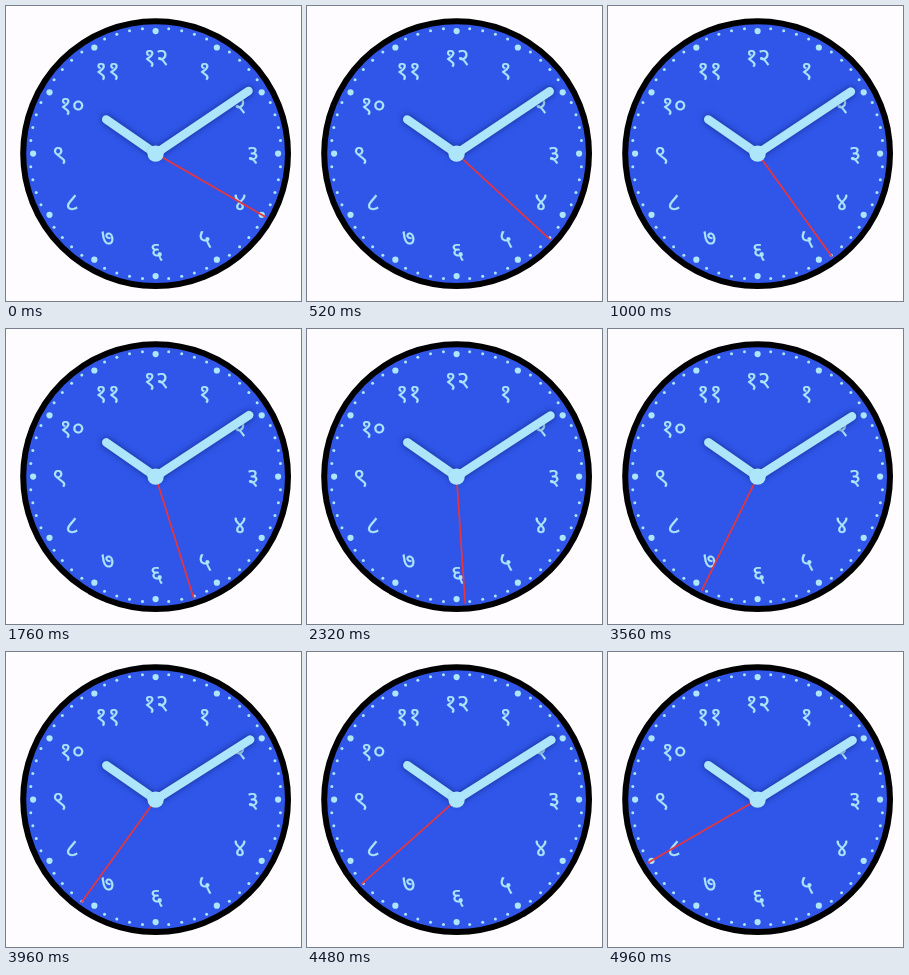
Write an HTML page that moves like this. It is 295 px wide and 295 px high and loops after 5000 ms.

```html
<!DOCTYPE html>
<html lang="hi">
<head>
<meta charset="utf-8">
<title>Clock</title>
<style>
  html, body { margin: 0; width: 100%; height: 100%; overflow: hidden; background: #fefcff; }
  svg { display: block; width: 100vw; height: 100vh; }
  text {
    font: 24.5px "Noto Sans", "Noto Sans Devanagari", sans-serif;
    letter-spacing: -.6px;
    text-anchor: middle;
    stroke: #ade5fa;
    stroke-width: .25;
  }
  .pale { fill: #ade5fa; }
  .hand { stroke: #ade5fa; stroke-width: 8.6; stroke-linecap: round; }
  .shade { filter: drop-shadow(0 0 3px rgba(8, 20, 90, .65)); }
</style>
</head>
<body>
<svg viewBox="0 0 295 295">
  <g transform="translate(149.6 147.6)">
    <circle r="132.4" fill="#2f56e9" stroke="#000" stroke-width="6"/>
    <g id="dial" class="pale"></g>
    <g class="shade"><line id="hour" class="hand" y2="-60"/></g>
    <g class="shade"><line id="minute" class="hand" y2="-112"/></g>
    <line id="second" y2="-127.5" stroke="#e8343c" stroke-width="1.7"/>
    <circle class="pale" r="8.2"/>
  </g>
</svg>
<script>
const LOOP = 5000, STEP = 40, LAST = LOOP / STEP - 1;
const START = 10 * 3600 + 9 * 60 + 20, SPAN = 20;
const $ = id => document.getElementById(id);
const dial = $('dial');

function add(tag, attrs, label = '') {
  const el = document.createElementNS('http://www.w3.org/2000/svg', tag);
  for (const key in attrs) el.setAttribute(key, attrs[key]);
  el.textContent = label;
  dial.append(el);
}

const polar = (turn, r) => [r * Math.sin(turn * 2 * Math.PI), -r * Math.cos(turn * 2 * Math.PI)];
const devanagari = n => String(n).replace(/\d/g, d => String.fromCharCode(0x966 + +d));

for (let i = 0; i < 60; i++) {
  const onHour = i % 5 === 0;
  const [cx, cy] = polar(i / 60, onHour ? 122.5 : 125.5);
  add('circle', { cx, cy, r: onHour ? 3.1 : 1.5 });
}
for (let n = 1; n <= 12; n++) {
  const [x, y] = polar(n / 12, 97);
  add('text', { x, y: y + 8 }, devanagari(n));
}

const turn = (id, degrees) => $(id).setAttribute('transform', `rotate(${degrees})`);

function draw(now) {
  const step = Math.floor((now % LOOP) / STEP);
  const clock = START + SPAN * step / LAST;
  turn('second', clock * 6 % 360);
  turn('minute', clock / 10 % 360);
  turn('hour', clock / 120 % 360);
}

let begin;
function tick(now) {
  begin ??= now;
  draw(now - begin);
  requestAnimationFrame(tick);
}
draw(0);
requestAnimationFrame(tick);
</script>
</body>
</html>
```
